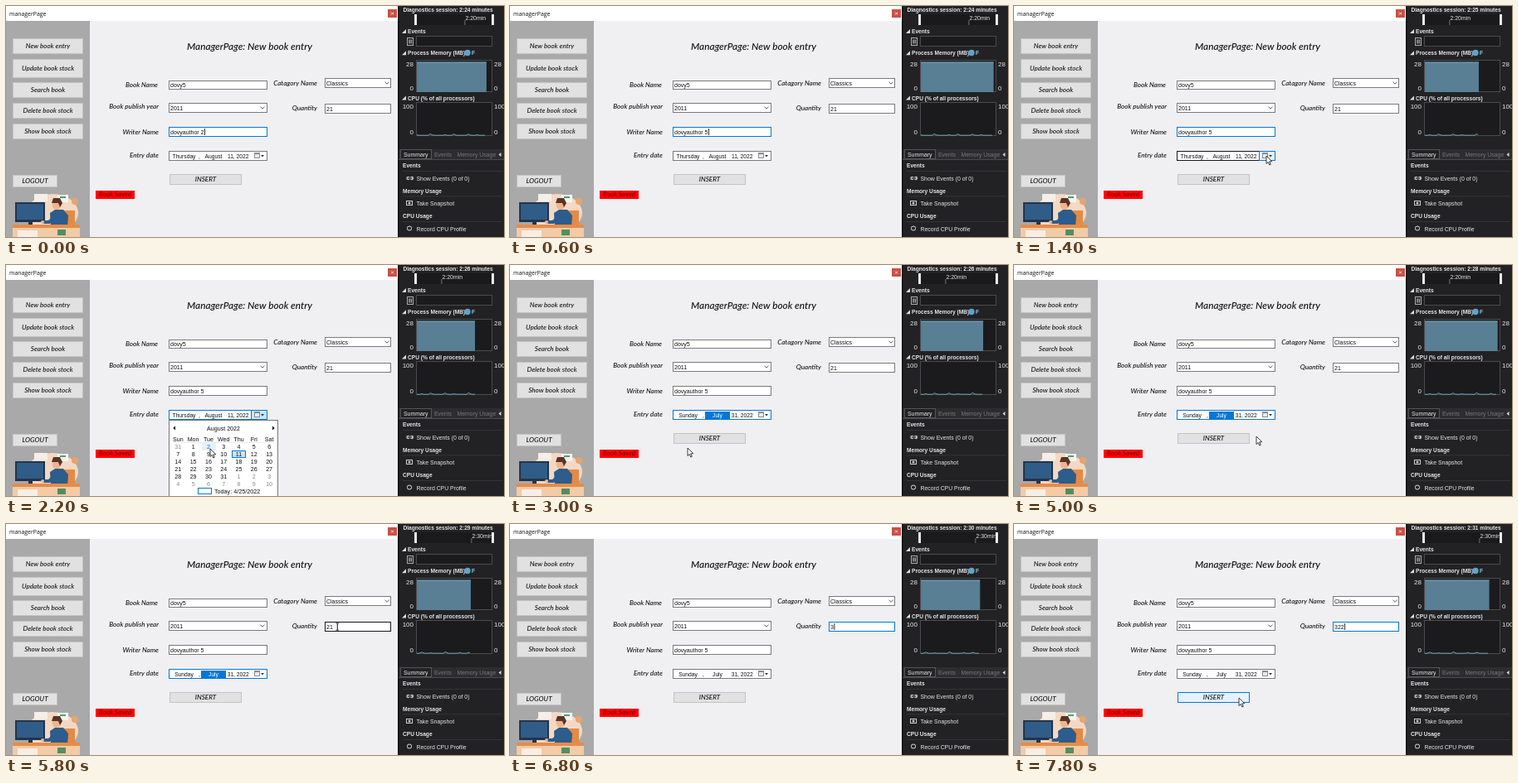
An HTML page with a canvas for the animation above (8000 ms loop, 600 px wide and 279 px high).

```html
<!DOCTYPE html>
<html lang="en">
<head>
<meta charset="utf-8">
<title>Manager page</title>
<style>
html, body { margin: 0; width: 100%; height: 100%; overflow: hidden; background: #f0eff1; }
canvas { display: block; width: 600px; height: 279px; }
</style>
</head>
<body>
<canvas id="stage"></canvas>
<script>
const LOOP = 8000, STEP = 200;
const BLUE = '#0078d7', INK = '#111';
const UI = '"Liberation Sans", Arial, sans-serif';
const HAND = 'italic 500 8.1px Lato, sans-serif';
const canvas = document.getElementById('stage');
const c = canvas.getContext('2d');
const scale = window.devicePixelRatio || 1;
canvas.width = 600 * scale;
canvas.height = 279 * scale;

function rect(x, y, w, h, fill, border) {
  if (fill) { c.fillStyle = fill; c.fillRect(x, y, w, h); }
  if (border) {
    c.strokeStyle = border;
    c.lineWidth = 1;
    c.strokeRect(x + .5, y + .5, w - 1, h - 1);
  }
}

function text(s, x, y, { font = `7px ${UI}`, color = INK, align = 'left' } = {}) {
  c.font = font;
  c.fillStyle = color;
  c.textAlign = align;
  c.fillText(s, x, y);
}

function poly(points, fill, stroke, width = 1) {
  c.beginPath();
  points.forEach(([x, y]) => c.lineTo(x, y));
  if (fill) { c.closePath(); c.fillStyle = fill; c.fill(); }
  if (stroke) { c.strokeStyle = stroke; c.lineWidth = width; c.stroke(); }
}

function disc(x, y, rx, fill, ry = rx) {
  c.beginPath();
  c.ellipse(x, y, rx, ry, 0, 0, 7);
  c.fillStyle = fill;
  c.fill();
}

function chevron(x, y) {
  poly([[x - 2.5, y - 1.2], [x, y + 1.2], [x + 2.5, y - 1.2]], null, '#444', .9);
}

function button(label, x, y, w, h, hover) {
  rect(x, y, w, h, hover ? '#e5f1fb' : '#e1e1e1', hover ? BLUE : '#c4c4c4');
  text(label, x + w / 2, y + h / 2 + 2.6, { font: HAND, align: 'center' });
}

function field(value, x, y, w, h, border = '#7a7a7a') {
  rect(x, y, w, h, '#fff', border);
  text(value, x + 2, y + h / 2 + 2.6);
}

function caret(value, x, y) {
  c.font = `7px ${UI}`;
  rect(x + c.measureText(value).width + .6, y, .8, 8, '#000');
}

function illustration() {
  disc(56, 250, 31, '#f3d9c4', 23);
  rect(34, 227, 16, 9, '#f6eee8');
  rect(62, 228, 13, 9, '#f6f3ef');
  rect(65, 230, 7, 2, '#4fa06c');
  disc(83, 236, 4, '#e9a46c');
  rect(11, 237, 36, 24, '#25344c');
  rect(13, 239, 32, 19, '#2f5d87');
  rect(27, 261, 5, 6, '#25344c');
  rect(68, 247, 15, 22, '#e58a45');
  poly([[53, 250], [59, 246], [69, 246], [75, 253], [74, 268], [54, 268]], '#2c5d8c');
  disc(61, 240, 5.5, '#efb58f', 6);
  poly([[55, 238], [57, 232], [65, 232], [68, 238], [65, 243], [63, 238]], '#5b3327');
  poly([[59, 254], [52, 261], [45, 261]], null, '#2c5d8c', 4);
  disc(44, 261, 2, '#efb58f');
  rect(8, 264, 81, 4, '#e78c48');
  rect(8, 268, 81, 11, '#f3cba6');
  rect(14, 271, 24, 8, '#f8eee5');
  rect(62, 270, 10, 7, '#4f8f63');
}

function windowFrame() {
  rect(0, 0, 472, 279, '#f0eff1');
  rect(0, 0, 472, 18, '#fff');
  text('managerPage', 4, 11.5, { font: `6.9px "Open Sans", sans-serif` });
  rect(460, 4, 11, 10, '#c95048');
  poly([[464, 7.5], [467, 10.5]], null, '#fff', .8);
  poly([[467, 7.5], [464, 10.5]], null, '#fff', .8);
  rect(0, 18, 101, 261, '#a9a9a9');
  [['New book entry', 39, 19], ['Update book stock', 64, 23], ['Search book', 92, 19],
   ['Delete book stock', 117, 19], ['Show book stock', 142, 19]]
    .forEach(([label, y, h]) => button(label, 8, y, 85, h));
  button('LOGOUT', 8, 204, 54, 15);
  illustration();
  text('ManagerPage: New book entry', 293.5, 53,
    { font: 'italic 500 11.8px Lato, sans-serif', align: 'center' });
  [['Book Name', 183, 98], ['Book publish year', 184, 124], ['Writer Name', 184, 154.5],
   ['Entry date', 184, 183], ['Catagory Name', 375, 96], ['Quantity', 375, 126]]
    .forEach(([label, x, y]) => text(label, x, y, { font: HAND, align: 'right' }));
  rect(108, 223, 47, 10, '#f00');
  text('Book Saved', 131.5, 230, { font: HAND, color: '#7a0000', align: 'center' });
}

function datePicker(t, hover) {
  const chosen = t >= 2800, focus = t >= 1600 && t < 6000, open = t >= 1800 && t < 2800;
  rect(196, 175, 119, 12, '#fff', focus ? BLUE : hover ? '#171717' : '#7a7a7a');
  if (open || hover) rect(295, 175, 20, 12, open ? '#cce4f7' : '#e5f1fb', BLUE);
  const marked = chosen && focus;
  if (marked) rect(235, 177, 30, 9, BLUE);
  const font = `6.7px ${UI}`;
  const part = (s, x, color = INK) => text(s, x, 183.5, { font, color, align: 'center' });
  part(chosen ? 'Sunday' : 'Thursday', 214.5);
  part(',', 233);
  part(chosen ? 'July' : 'August', 250, marked ? '#fff' : INK);
  part(chosen ? '31, 2022' : '11, 2022', 279.7);
  rect(299, 177, 7, 7, '#e9e9ee', '#8b8b96');
  rect(299, 177, 7, 2, '#8b8b96');
  poly([[307, 180], [311, 180], [309, 182.5]], '#333');
  if (open) calendar(t);
}

function calendar(t) {
  const center = { align: 'center', font: `7.1px ${UI}` };
  rect(196, 187, 132, 93, '#fff', '#777');
  poly([[204, 194.5], [204, 199.5], [201.3, 197]], '#111');
  poly([[321, 194.5], [321, 199.5], [323.7, 197]], '#111');
  text('August 2022', 262, 199.5, center);
  const column = i => 207.3 + i * 18.3;
  ['Sun', 'Mon', 'Tue', 'Wed', 'Thu', 'Fri', 'Sat']
    .forEach((day, i) => text(day, column(i), 212.5, center));
  rect(201, 214, 122, .6, '#ddd');
  rect(272, 224, 17, 9, '#cce4f7', BLUE);
  const hovered = t < 2400 ? 2 : 0;
  rect(column(hovered) - 8, 215, 17, 9, '#e5f1fb');
  for (let i = 0; i < 42; i++) {
    const day = new Date(2022, 6, 31 + i);
    const inMonth = day.getMonth() === 7;
    const color = i === hovered ? BLUE : inMonth ? INK : '#888';
    text(day.getDate(), column(i % 7), 222 + Math.floor(i / 7) * 9, { ...center, color });
  }
  rect(231, 269, 17, 8, '#fff', BLUE);
  text('Today: 4/25/2022', 251, 275.5, { font: `7.2px ${UI}` });
}

function form(t, pointer) {
  const over = (x, y, w, h) => pointer &&
    pointer.x >= x && pointer.x <= x + w && pointer.y >= y && pointer.y <= y + h;

  field('dovy5', 196, 90, 119, 11);
  field('2011', 196, 117, 119, 12);
  chevron(309, 123);
  const writer = 'dovyauthor ' + (t < 400 ? '2' : t < 600 ? '' : '5');
  field(writer, 196, 146, 119, 12, t < 1600 ? BLUE : '#7a7a7a');
  if (t < 1000) caret(writer, 198, 148);
  field('Classics', 384, 87, 80, 12);
  chevron(459, 93);

  const focus = t >= 6000;
  const quantity = t < 6800 ? '21' : '322'.slice(0, Math.floor((t - 6600) / STEP));
  field(quantity, 384, 118, 80, 12,
    focus ? BLUE : over(384, 118, 80, 12) ? '#171717' : '#7a7a7a');
  if (t >= 6400 && t < 6800) {
    rect(386, 120, 8, 8, BLUE);
    text(quantity, 386, 126.6, { color: '#fff' });
  } else if (focus) caret(quantity, 386, 120);

  button('INSERT', 197, 203, 87, 13, over(197, 203, 87, 13));
  datePicker(t, t < 1800 && over(296, 175, 19, 13));
}

const bold = { font: `bold 6.6px ${UI}`, color: '#e6e6e6' };
const plain = { font: `6.9px ${UI}`, color: '#e6e6e6' };
const axis = { font: `8px ${UI}`, color: '#e6e6e6' };

function graph(title, y, top, bottom, max) {
  poly([[482, y - 5], [482, y], [477, y]], '#ddd');
  text(title, 484, y, bold);
  rect(494, top, 92, bottom - top, '#1b1b1d', '#4b4b4f');
  if (!max) return;
  [[max, top + 7.5], ['0', bottom - 2]].forEach(([label, baseline]) => {
    text(label, 491, baseline, { ...axis, align: 'right' });
    text(label, 588, baseline, axis);
  });
}

function diagnostics(t) {
  const page = Math.floor((t + 3000) / 4400);
  const end = Math.min(585, 560 + (t + 3000) % 4400 * .0063);
  const shift = page * 28;

  rect(472, 0, 128, 279, '#222224');
  rect(472, 0, 1.5, 279, '#111');
  const second = Math.max(24, 24 + Math.floor((t - 100) / 1000));
  text(`Diagnostics session: 2:${second} minutes`, 478.5, 6.8, bold);

  rect(494, 10, 92, 13, '#1a1a1c');
  [['2:20min', 553], ['2:30min', 617]].forEach(([label, x]) => {
    const left = x - shift;
    if (left < 510 || left > 570) return;
    text(label, left + .5, 16.5, plain);
    rect(left - .5, 17, .8, 6, '#888');
  });
  rect(492, 10, 3, 13, '#ececec');
  rect(585, 10, 3, 13, '#ececec');

  graph('Events', 33, 36, 49);
  rect(483, 38, 8, 10, null, '#aaa');
  rect(485.5, 40.5, 1, 5, '#ddd');
  rect(487.7, 40.5, 1, 5, '#ddd');

  graph('Process Memory (MB)', 59.3, 65, 104, '28');
  rect(495, 68, end - 495, 36, '#587f94');
  rect(495, 67.5, end - 495, 1, '#7fadc3');
  disc(556, 56.5, 3.7, '#5fa3cd');
  text('F', 561, 59.3, { ...bold, color: '#8dc3e3' });

  graph('CPU (% of all processors)', 113.5, 116, 157, '100');
  const load = [];
  for (let x = 495; x < end; x += 2) {
    const w = x + shift;
    load.push([x, 156.2 - 2.4 * Math.max(0, Math.sin(w * .55) * Math.sin(w * .13 + 1) - .25)]);
  }
  poly(load, null, '#77b0c7', .9);

  rect(473, 173, 127, 12, '#2d2d30');
  rect(475, 173, 38, 12, '#222224', '#55555a');
  rect(473, 185, 127, 1, '#4b4b4f');
  text('Summary', 479, 181.5, plain);
  text('Events', 516, 181.5, { ...plain, color: '#77777b' });
  text('Memory Usage', 543.5, 181.5, { ...plain, color: '#77777b' });
  rect(592, 173, 8, 12, '#2d2d30');
  poly([[596.5, 177], [596.5, 182], [593.5, 179.5]], '#ddd');

  [['Events', 'Show Events (0 of 0)', 195], ['Memory Usage', 'Take Snapshot', 225.5],
   ['CPU Usage', 'Record CPU Profile', 256]].forEach(([title, action, y]) => {
    text(title, 478, y, bold);
    rect(478, y + 4, 120, .7, '#3d3d41');
    text(action, 494.5, y + 15.5, plain);
  });
  disc(484.5, 208, 2.2, '#bbb');
  disc(489, 208, 2.2, '#bbb');
  rect(484, 207.4, 5, 1.2, '#222224');
  rect(482, 235, 8, 6, null, '#ccc');
  disc(486, 238, 1.5, '#ccc');
  disc(486, 268.5, 3, '#ccc');
  disc(486, 268.5, 2.1, '#222224');
}

const route = [
  [600, 240, 155], [1400, 304, 181], [1800, 304, 182], [2200, 246, 222], [2600, 212, 220],
  [3000, 214, 221], [3400, 216, 221], [4200, 296, 188], [4600, 299, 194], [5000, 292, 207],
  [5600, 399, 124], [6200, 400, 124], [6600, 379, 125], [7200, 377, 126], [7800, 271, 210], [8000, 271, 210]
];

function pointerAt(t) {
  if (t < 800 || (t >= 6800 && t < 7400)) return null;
  const i = route.findIndex(stop => stop[0] > t);
  const [t0, x0, y0] = route[i - 1], [t1, x1, y1] = route[i];
  const p = (t - t0) / (t1 - t0), k = p * p * (3 - 2 * p);
  return { x: x0 + (x1 - x0) * k, y: y0 + (y1 - y0) * k };
}

function drawPointer({ x, y }) {
  const inQuantity = x > 384 && x < 464 && y > 118 && y < 130;
  const inWriter = x > 196 && x < 315 && y > 146 && y < 158;
  if (inQuantity || inWriter) {
    rect(x - .5, y - 4, 1, 8, '#111');
    rect(x - 2, y - 4.5, 4, .8, '#111');
    rect(x - 2, y + 3.7, 4, .8, '#111');
    return;
  }
  const shape = [[0, 0], [0, 9.5], [2.2, 7.4], [3.8, 11], [5.3, 10.3], [3.7, 6.9], [6.8, 6.7]]
    .map(([dx, dy]) => [x + dx, y + dy]);
  poly([...shape, shape[0]], '#fff', '#111', .8);
}

function draw(now) {
  const t = Math.floor(now % LOOP / STEP) * STEP;
  const pointer = pointerAt(t);
  c.setTransform(scale, 0, 0, scale, 0, 0);
  windowFrame();
  form(t, pointer);
  diagnostics(t);
  if (pointer) drawPointer(pointer);
}

const start = performance.now();
function tick() {
  draw(performance.now() - start);
  requestAnimationFrame(tick);
}
tick();
</script>
</body>
</html>
```
